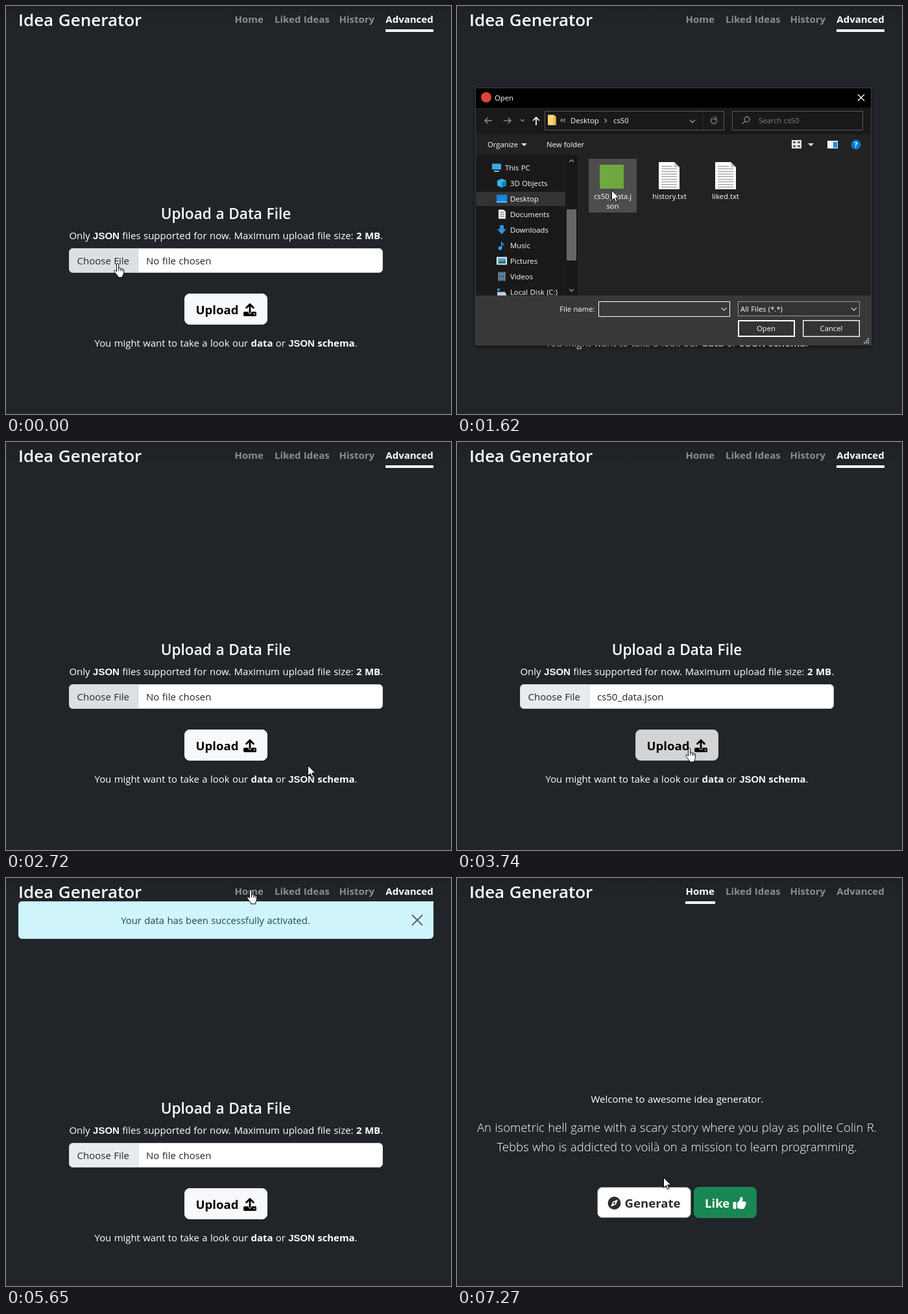
Write an HTML page that moves like this. It is 686x630 px and loops after 8 s.

```html
<!DOCTYPE html>
<html lang="en">
<head>
<meta charset="utf-8">
<title>Idea Generator</title>
<style>
html, body { margin: 0; width: 100%; height: 100%; overflow: hidden; background: #212529; }
svg { display: block; }
text { font: 15px "Open Sans", "Noto Sans", sans-serif; word-spacing: .035em; fill: #fff; white-space: pre; }
.mid { text-anchor: middle; }
.b { font-weight: 700; }
.caps { font-family: "Liberation Sans", sans-serif; font-weight: 700; }
.brand { font-size: 26px; font-weight: 600; }
.head { font-size: 22.6px; font-weight: 600; }
.hint { font-size: 14.9px; }
.nav text { font-weight: 700; fill: #8c8c92; }
.nav text.on { fill: #fff; }
.ink { fill: #212529; }
.btn { font-size: 18.6px; font-weight: 700; }
.idea { font-size: 18.5px; font-weight: 350; }
#dialog text { font-size: 11.3px; }
.line { fill: none; stroke-width: 1.3; }
</style>
</head>
<body>
<svg width="686" height="630" viewBox="0 0 686 630">
  <defs>
    <linearGradient id="shade" x2="0" y2="1">
      <stop stop-opacity=".1"/><stop offset="1" stop-opacity="0"/>
    </linearGradient>
    <filter id="drop" x="-5%" y="-5%" width="110%" height="112%">
      <feDropShadow dx="0" dy="2" stdDeviation="3" flood-opacity=".55"/>
    </filter>
    <g id="sheet">
      <path d="M0 0H24L32 8V42H0Z" fill="#fff"/>
      <path d="M24 0V8H32Z" fill="#c4c4c4"/>
      <path d="M4 6.5H21M4 10.5H28M4 14.5H28M4 18.5H28M4 22.5H28M4 26.5H28M4 30.5H28M4 34.5H28M4 38.5H28" stroke="#8d8d8d"/>
    </g>
  </defs>

  <rect width="686" height="630" fill="#212529"/>
  <rect width="686" height="36" fill="url(#shade)"/>
  <text class="brand" x="19" y="31">Idea Generator</text>
  <g class="nav">
    <text id="navHome" x="352.5" y="26">Home</text>
    <text x="414" y="26">Liked Ideas</text>
    <text x="513.5" y="26">History</text>
    <text id="navAdv" x="585.3" y="26">Advanced</text>
  </g>
  <rect id="bar" y="36" height="4" fill="#fff"/>

  <g id="upload">
    <text class="head mid" x="339" y="329">Upload a Data File</text>
    <text class="mid" x="339.3" y="360">Only <tspan class="caps">JSON</tspan> files supported for now. Maximum upload file size: <tspan class="b">2 MB</tspan>.</text>
    <rect id="ring" x="95" y="372" width="488" height="42" rx="7" fill="none" stroke="#0d6efd" stroke-opacity=".3" stroke-width="4"/>
    <rect x="97.5" y="374.5" width="483" height="37" rx="5.5" fill="#fff"/>
    <path id="choose" d="M204 375V411H103Q98 411 98 406V380Q98 375 103 375Z"/>
    <path d="M203.5 375V411" stroke="#ced4da"/>
    <rect id="edge" x="97.5" y="374.5" width="483" height="37" rx="5.5" fill="none"/>
    <text class="ink" x="109.5" y="399">Choose File</text>
    <text class="ink" id="chosen" x="216" y="399"></text>
    <rect id="send" x="275.5" y="444.5" width="127" height="47" rx="7.5"/>
    <text class="btn" x="292.5" y="476" style="fill:#000">Upload</text>
    <path d="M376 473V461M370.5 466L376 460.5 381.5 466" fill="none" stroke="#000" stroke-width="2.8" stroke-linecap="round" stroke-linejoin="round"/>
    <path d="M368 472H373.5Q374 475.5 376 475.5T378.5 472H384Q386 472 386 474V477Q386 479 384 479H368Q366 479 366 477V474Q366 472 368 472Z"/>
    <circle cx="382.8" cy="475.6" r="1" fill="#fff"/>
    <text class="hint mid" x="339" y="526">You might want to take a look our <tspan class="b">data</tspan> or <tspan class="caps">JSON</tspan><tspan class="b"> schema</tspan>.</text>
  </g>

  <g id="alert">
    <rect x="19.5" y="36.5" width="639" height="57" rx="5" fill="#cff4fc" stroke="#b6effb"/>
    <text class="mid" x="323" y="71" style="fill:#1c4a58;font-size:14.8px">Your data has been successfully activated.</text>
    <path d="M626.5 57.5L641.5 72.5M641.5 57.5L626.5 72.5" stroke="#5c6365" stroke-width="1.9" stroke-linecap="round"/>
  </g>

  <g id="home">
    <text class="mid" x="339.5" y="347">Welcome to awesome idea generator.</text>
    <text class="idea mid" x="339" y="392">An isometric hell game with a scary story where you play as polite Colin R.</text>
    <text class="idea mid" x="339" y="422">Tebbs who is addicted to voilà on a mission to learn programming.</text>
    <rect x="216.5" y="477.5" width="144" height="47" rx="7.5" fill="#fff" stroke="#6c757d"/>
    <circle cx="242.5" cy="502" r="10" fill="#2a2e31"/>
    <path d="M248 496.5L244.8 504.3 237 507.5 240.2 499.7Z" fill="#fff"/>
    <circle cx="242.5" cy="502" r="1.5" fill="#2a2e31"/>
    <text class="btn" x="258.5" y="509" style="fill:#2a2e31">Generate</text>
    <rect x="365" y="477" width="97" height="48" rx="8" fill="#198754"/>
    <text class="btn" x="382" y="509">Like</text>
    <rect x="425.5" y="500" width="5" height="11" rx="1.2" fill="#fff"/>
    <path d="M432 501.5C435.5 499 436.3 496 436.8 493.5 437.4 491.6 440.6 492.2 440.6 495.4 440.6 497 440 498.3 439.4 499.5H443.5Q446 500 445.5 502.5 445.8 503.8 444.8 505 445 506.5 443.6 507.6 443.5 510.8 440 511H437Q434.5 511 432 509Z" fill="#fff"/>
  </g>

  <g id="dialog">
    <rect x="28.5" y="126.5" width="610" height="397" fill="#202020" stroke="#3f3f3f" filter="url(#drop)"/>
    <rect x="29" y="127" width="609" height="30"/>
    <circle cx="45" cy="141" r="8" fill="#db4437"/>
    <text x="58" y="146">Open</text>
    <path class="line" d="M618 136.5L628 146.5M628 136.5L618 146.5" stroke="#fff"/>

    <rect x="29" y="157" width="609" height="41" fill="#191919"/>
    <g class="line">
      <path d="M54 177H43M47.5 172.5L43 177 47.5 181.5M72 177H83M78.5 172.5L83 177 78.5 181.5" stroke="#8c8c8c" stroke-width="1.6"/>
      <path d="M98 175L101 178 104 175" stroke="#8c8c8c"/>
      <path d="M122 184V172M117 177L122 172 127 177" stroke="#fff" stroke-width="1.7"/>
      <path d="M135.5 162.5H411.5V191.5H135.5ZM424.5 162.5H625.5V191.5H424.5Z" stroke="#5a5a5a" stroke-width="1"/>
      <path d="M162.5 174L160 176.5 162.5 179M166.5 174L164 176.5 166.5 179M227.5 174L230.5 177 227.5 180M359 176L363 180 367 176" stroke="#a0a0a0"/>
      <path d="M379.5 163V191" stroke="#262626"/>
      <path d="M399.5 174.5A4.5 4.5 0 1 1 395 172.8M397 170L399.8 174.5 394.8 175.2" stroke="#8a8a8a"/>
      <path d="M444 178L440 182M451 175A4 4 0 1 1 443 175 4 4 0 0 1 451 175" stroke="#8a8a8a"/>
    </g>
    <path d="M140 168H149L152.5 171V184H140Z" fill="#f7d774"/>
    <path d="M149 168V184H152.5V171Z" fill="#e3b84b"/>
    <text x="175" y="181">Desktop</text>
    <text x="241" y="181">cs50</text>
    <text x="465" y="181" style="fill:#858585">Search cs50</text>

    <text x="47" y="218">Organize</text>
    <text x="138" y="218">New folder</text>
    <path d="M99 212H108L103.5 216.5ZM541 212H550L545.5 216.5Z" fill="#ddd"/>
    <path d="M516 207H531V220H516Z" fill="#e8e8e8"/>
    <path d="M518 209H522V212H518ZM525 209H529V212H525ZM518 215H522V218H518ZM525 215H529V218H525Z" fill="#4b6a86"/>
    <path d="M571 208H587V220H571Z" fill="#f2f2f2"/>
    <path d="M580 210H586V219H580Z" fill="#1d8be0"/>
    <circle cx="615" cy="214" r="7.5" fill="#0a78c8"/>
    <text class="mid b" x="615" y="218">?</text>

    <rect x="29" y="230" width="158" height="217" fill="#191919"/>
    <path d="M187.5 230V447" stroke="#2d2d2d"/>
    <rect x="30" y="287" width="137" height="22" fill="#333"/>
    <g id="tree"></g>
    <rect x="169" y="231" width="15" height="216" fill="#171717"/>
    <rect x="169" y="314" width="15" height="79" fill="#666"/>
    <path class="line" d="M173 241L176.5 237.5 180 241M173 437L176.5 440.5 180 437" stroke="#9a9a9a"/>

    <rect id="tile" x="203" y="236" width="74" height="83"/>
    <rect x="220" y="245" width="37" height="37" fill="#6fa83f"/>
    <use href="#sheet" x="311" y="241"/>
    <use href="#sheet" x="398" y="241"/>
    <text class="mid" x="240" y="298">cs50_data.j</text>
    <text class="mid" x="240" y="313">son</text>
    <text class="mid" x="327.5" y="298">history.txt</text>
    <text class="mid" x="414" y="298">liked.txt</text>

    <rect x="29" y="447" width="609" height="76" fill="#383838"/>
    <text x="212.5" y="472" text-anchor="end">File name:</text>
    <rect x="218.5" y="456.5" width="202" height="23" fill="#383838" stroke="#fff"/>
    <text id="fileName" x="222" y="472"></text>
    <rect x="433.5" y="456.5" width="187" height="22" fill="#333" stroke="#9b9b9b"/>
    <text x="437" y="472">All Files (*.*)</text>
    <path class="line" d="M407.5 466L411.5 470 415.5 466M608 466L612 470 616 466" stroke="#c8c8c8"/>
    <rect id="openBtn" x="434" y="486" width="86" height="24" stroke="#fff" stroke-width="2"/>
    <text class="mid" x="476.5" y="502">Open</text>
    <rect x="533.7" y="485.7" width="86.6" height="24.6" fill="#333" stroke="#fff" stroke-width="1.4"/>
    <text class="mid" x="577" y="502">Cancel</text>
    <path d="M633 513h2v2h-2zM630 516h2v2h-2zM633 516h2v2h-2zM627 519h2v2h-2zM630 519h2v2h-2zM633 519h2v2h-2z" fill="#bbb"/>
  </g>

  <g id="pointer" stroke="#000" fill="#fff" stroke-linejoin="round">
    <path id="arrow" d="M.5.5V16.5L4.2 13 6.6 18.5 9 17.5 6.6 12H11.8Z"/>
    <g id="hand" transform="translate(-7 -1)">
      <path d="M4.5 13V2a1.6 1.6 0 0 1 3.2 0V8c.5-1 2.6-.8 3 .6 .7-.8 2.3-.4 2.6.8 1-.5 2.3.2 2.3 1.5V15c0 2-1.5 3.3-1.8 5V22H6.5v-1.8C5 18 1.5 14.8.8 12.8 .3 11.2 2.2 10.5 3.2 11.6Z"/>
      <path d="M7.7 8V12M10.7 8.6V12.2M13.3 9.4V12.6" fill="none"/>
    </g>
  </g>
</svg>

<script>
const LOOP = 8000;
const $ = id => document.getElementById(id);
const ramp = (t, a, b) => Math.min(1, Math.max(0, (t - a) / (b - a)));
const within = (t, a, b) => t >= a && t < b;
const show = (id, on) => { $(id).style.display = on ? "" : "none"; };

// Folder tree: label, indent, icon drawn in a 16 px box
const tree = [
  ["This PC", 74, '<path d="M1 2H15V11H1Z" fill="#39a9ec"/><path d="M4 13H12V14.5H4Z" fill="#cfd8df"/>'],
  ["3D Objects", 82, '<path d="M1 4L8 1 15 4V12L8 15 1 12Z" fill="#35b2e5"/><path d="M8 7L15 4V12L8 15Z" fill="#0f7fb8"/>'],
  ["Desktop", 82, '<path d="M0 2H16V14H0Z" fill="#1287e0"/><path d="M0 12H16V14H0Z" fill="#5cc2ff"/>'],
  ["Documents", 82, '<path d="M3 1H11L14 4V15H3Z" fill="#f3f3f3"/><path d="M5 5H12M5 8H12M5 11H12" stroke="#4e6f8c"/>'],
  ["Downloads", 82, '<path d="M5 1H11V7H15L8 15 1 7H5Z" fill="#2a93e8"/>'],
  ["Music", 82, '<path d="M7 1C8 5 13 5 11 10 11 7 9 7 8.5 6.5V12A3 3 0 1 1 7 9.8Z" fill="#2ba0f0"/>'],
  ["Pictures", 82, '<path d="M0 2H16V14H0Z" fill="#eee"/><path d="M2 4H14V12H2Z" fill="#3da4dc"/><path d="M2 12L6 8 9 10 12 7 14 9V12Z" fill="#356a4c"/>'],
  ["Videos", 82, '<path d="M2 1H14V15H2Z" fill="#555"/><path d="M5 2H11V7H5ZM5 9H11V14H5Z" fill="#4a86c5"/><path d="M3.5 2V15M12.5 2V15" stroke="#ddd" stroke-dasharray="1.5"/>'],
  ["Local Disk (C:)", 82, '<path d="M1 3H5V6H1Z" fill="#25a6ef"/><path d="M1 8H13L15 12V15H1Z" fill="#c9cdd1"/>'],
];
$("tree").innerHTML = tree.map(([label, x, icon], i) => {
  const y = 249.5 + i * 24;
  return `<g transform="translate(${x - 21} ${y - 8})">${icon}</g><text x="${x}" y="${y + 4}">${label}</text>`;
}).join("");

// The screen refreshes only at these moments: [first, last], every 100 ms in between
const bursts = [[0, 0], [100, 300], [500, 1220], [1320, 2120], [2220, 2940],
  [3040, 3740], [4150, 4150], [4750, 5250], [5970, 5970], [6470, 7270]];
const ticks = bursts.flatMap(([a, b]) => {
  const list = [];
  for (let t = a; t < b - 50; t += 100) list.push(t);
  return [...list, b];
});

// Pointer path: time, x, y
const path = [
  [0, 173, 398], [300, 169, 392], [1220, 168, 392], [1420, 205, 332], [1620, 238, 284],
  [1920, 239, 285], [2120, 330, 372], [2320, 458, 492], [2420, 465, 499], [2940, 465, 499],
  [3240, 415, 490], [3540, 361, 475], [3640, 359, 473], [4650, 359, 473], [4850, 385, 335],
  [4950, 403, 180], [5050, 397, 80], [5150, 382, 32], [5250, 378, 19], [6370, 378, 19],
  [6570, 356, 90], [6670, 350, 170], [6870, 338, 285], [7170, 320, 450], [7270, 318, 462],
];
function pointAt(t) {
  const i = path.findIndex(p => p[0] > t);
  if (i < 0) return path[path.length - 1].slice(1);
  const [a, b] = [path[i - 1], path[i]];
  const k = ramp(t, a[0], b[0]);
  return [a[1] + (b[1] - a[1]) * k, a[2] + (b[2] - a[2]) * k];
}

function draw(now) {
  const t = ticks.filter(x => x <= now).pop();
  const [x, y] = pointAt(t);
  const home = t >= 5970, alert = within(t, 4150, 5970);

  show("upload", !home);
  show("home", home);
  show("alert", alert);
  $("upload").setAttribute("transform", `translate(0 ${alert ? 35 : 0})`);
  $("navHome").setAttribute("class", home ? "on" : "");
  $("navAdv").setAttribute("class", home ? "" : "on");
  $("bar").setAttribute("x", home ? 352 : 585);
  $("bar").setAttribute("width", home ? 46 : 74);

  const ring = ramp(t, 420, 600) * (1 - ramp(t, 750, 950))
    + ramp(t, 2720, 2820) * (1 - ramp(t, 3540, 3740));
  $("ring").style.opacity = ring;
  $("edge").setAttribute("stroke", ring > .5 ? "#86b7fe" : "#ced4da");
  $("choose").setAttribute("fill", t < 2820 ? "#dde0e3" : "#e9ecef");
  $("chosen").textContent = within(t, 2820, 4150) ? "cs50_data.json" : "No file chosen";
  const hot = within(t, 3340, 4150);
  $("send").setAttribute("fill", hot ? "#d3d4d5" : "#f8f9fa");
  $("send").setAttribute("stroke", hot ? "#c6c7c8" : "#f8f9fa");

  const open = ramp(t, 750, 1000) * (1 - ramp(t, 2500, 2700));
  const size = .94 + .06 * open;
  show("dialog", open > 0);
  $("dialog").style.opacity = open;
  $("dialog").setAttribute("transform", `translate(333.5 325) scale(${size}) translate(-333.5 -325)`);
  $("tile").setAttribute("fill", t >= 1820 ? "#777" : within(t, 1520, 1820) ? "#4d4d4d" : "none");
  $("fileName").textContent = t >= 1920 ? "cs50_data.json" : "";
  $("openBtn").setAttribute("fill", t >= 2320 ? "#454545" : "#333");

  const hand = t < 500 || within(t, 3340, 4750) || within(t, 5150, 6470);
  show("hand", hand);
  show("arrow", !hand);
  $("pointer").setAttribute("transform", `translate(${Math.round(x)} ${Math.round(y)})`);
}

const start = performance.now();
function frame() {
  draw((performance.now() - start) % LOOP);
  requestAnimationFrame(frame);
}
frame();
</script>
</body>
</html>
```
